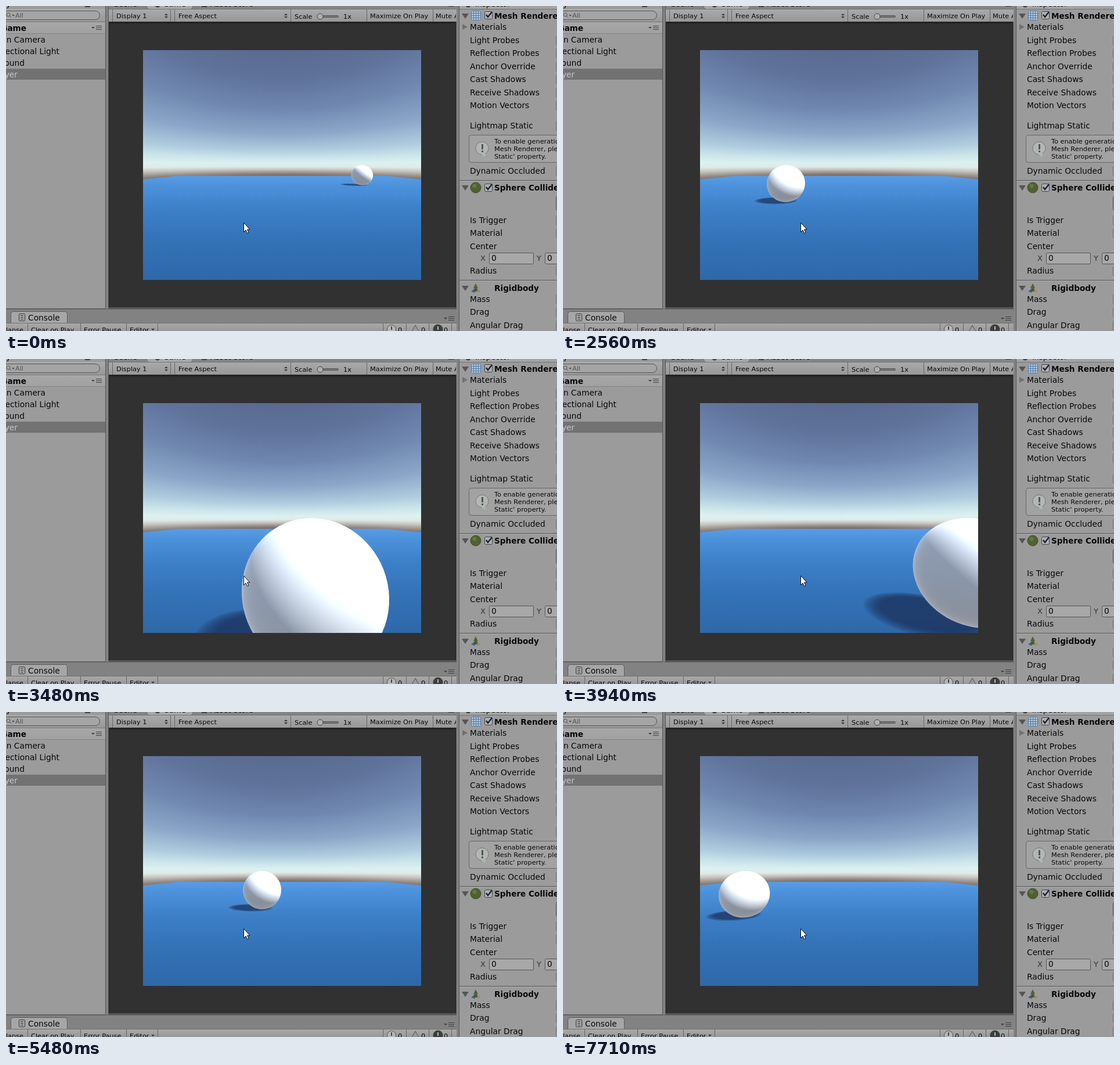
An HTML page with a canvas for the animation above (7780 ms loop, 949 px wide and 560 px high).

```html
<!DOCTYPE html>
<html lang="en">
<head>
<meta charset="utf-8">
<title>Rolling ball</title>
<style>
html, body { margin: 0; width: 100%; height: 100%; overflow: hidden; background: #828282; }
canvas { display: block; }
</style>
</head>
<body>
<canvas id="stage" width="949" height="560"></canvas>
<script>
const W = 949, H = 560, LOOP = 7780, STEPS = 101;
const VIEW = { x: 236, y: 76, w: 479, h: 396 }, CX = 475.5, CY = 274, FOCAL = 343, R = 0.5;
const LIGHT = [0.545, 0.779, -0.31];

// step, sideways position, distance from the camera
const PATH = [
  [0, 3.97, 9.9], [11, 2.9, 9.85], [21, -0.09, 9.25], [31, -1.12, 6.06], [33, -1.434, 5.42],
  [39, -1.7, 2.9], [45, 0.215, 1.455], [49, 0.95, 1.6], [53, 1.45, 2.4], [59, 1.493, 4.09],
  [64, 0.9, 5], [71, -0.523, 5.26], [75, -0.35, 4.45], [80, -0.1, 3.5], [86, 0.5, 3.1],
  [92, -0.2, 3.7], [97, -1.45, 4.05], [100, -2.034, 4.33]
];

const newCanvas = () => Object.assign(document.createElement('canvas'), { width: W, height: H });
const stage = document.getElementById('stage').getContext('2d');
const backdrop = newCanvas(), ballLayer = newCanvas();
const ballCtx = ballLayer.getContext('2d');
let g = backdrop.getContext('2d');

function box(x, y, w, h, fill) {
  g.fillStyle = fill;
  g.fillRect(x, y, w, h);
}

function poly(points, fill, stroke) {
  g.beginPath();
  points.forEach(([x, y]) => g.lineTo(x, y));
  g.closePath();
  if (fill) { g.fillStyle = fill; g.fill(); }
  if (stroke) { g.strokeStyle = stroke; g.stroke(); }
}

function round(x, y, w, h, r, fill, stroke) {
  g.beginPath();
  g.roundRect(x + 0.5, y + 0.5, w - 1, h - 1, r);
  g.fillStyle = fill;
  g.fill();
  if (stroke) { g.strokeStyle = stroke; g.stroke(); }
}

function disc(x, y, r, fill, stroke) {
  round(x - r, y - r, 2 * r, 2 * r, r, fill, stroke);
}

function text(s, x, y, { size = 13.8, color = '#080808', bold = false, align = 'left' } = {}) {
  g.font = `${bold ? 'bold ' : ''}${size}px "DejaVu Sans", sans-serif`;
  g.fillStyle = color;
  g.textAlign = align;
  g.fillText(s, x, y);
}

function gradient(y0, y1, stops) {
  const fill = g.createLinearGradient(0, y0, 0, y1);
  stops.forEach(([y, color]) => fill.addColorStop((y - y0) / (y1 - y0), color));
  return fill;
}

function clipped(x, y, w, h, draw) {
  g.save();
  g.beginPath();
  g.rect(x, y, w, h);
  g.clip();
  draw();
  g.restore();
}

const bar = (x, y, w, h) => box(x, y, w, h, gradient(y, y + h, [[y, '#aaa'], [y + h, '#989898']]));
const foldDown = (x, y) => poly([[x, y], [x + 12, y], [x + 6, y + 9]], '#555');
const project = ([x, y, z]) => [CX + FOCAL * x / z, CY - FOCAL * y / z];

function menuIcon(x, y) {
  poly([[x, y - 1], [x + 6, y - 1], [x + 3, y + 2]], '#404040');
  for (let i = -1; i < 2; i++) box(x + 8, y + i * 3, 10, 1, '#404040');
}

function spinner(x, y) {
  poly([[x - 3, y - 1], [x + 3, y - 1], [x, y - 4]], '#333');
  poly([[x - 3, y + 1], [x + 3, y + 1], [x, y + 4]], '#333');
}

function checkbox(x, y) {
  round(x, y, 14, 14, 2, '#b0b0b0', '#444');
  g.lineWidth = 2.4;
  g.strokeStyle = '#15233c';
  g.beginPath();
  g.moveTo(x + 3, y + 6);
  g.lineTo(x + 6, y + 10);
  g.lineTo(x + 13, y + 1);
  g.stroke();
  g.lineWidth = 1;
}

function drawHierarchy() {
  box(0, 0, 171, 521, '#9b9b9b');
  bar(0, 5, 171, 22);
  round(-10, 8, 172, 16, 8, '#a5a5a5', '#555');
  g.strokeStyle = '#555';
  g.beginPath();
  g.arc(4, 15, 3, 0, 7);
  g.moveTo(6, 17);
  g.lineTo(9, 20);
  g.stroke();
  poly([[10, 15], [15, 15], [12.5, 18]], '#555');
  text('All', 16, 20, { size: 11.3, color: '#555' });
  box(0, 27, 171, 21, gradient(27, 48, [[27, '#a8a8a8'], [48, '#a0a0a0']]));
  box(0, 27, 171, 1, '#777');
  box(0, 47, 171, 1, '#848484');
  text('Game', 35, 43, { size: 13.6, bold: true, align: 'right' });
  menuIcon(147, 37);
  box(0, 108, 171, 19, '#727272');
  ['Main Camera', 'Directional Light', 'Ground', 'Player'].forEach((name, i) =>
    text(name, [68, 92, 32, 20][i], 63 + 20 * i, { align: 'right', color: i == 3 ? '#c8c8c8' : '#080808' }));
  text('Hierarchy', 8, 1, { size: 13, align: 'right' });
  box(136, 0, 9, 2, '#444');
  box(171, 0, 1, 522, '#555');
  box(0, 521, 172, 1, '#555');
}

function drawSkyAndGround() {
  const sky = gradient(-200, 24, [
    [-200, '#596a90'], [-145, '#5f739b'], [-95, '#7088b0'], [-54, '#8ba6c8'], [-25, '#b0cddf'],
    [-12, '#cbe5ea'], [-3, '#dcf1f0'], [3, '#dfeae6'], [8, '#c3c2bf'], [13, '#9a918c'], [18, '#756963'],
    [24, '#655955']
  ]);
  // Lines of equal brightness bend away from the horizon towards the sides
  for (let x = 0; x < VIEW.w; x++) {
    const k = 1 + ((VIEW.x + x + 0.5 - CX) / FOCAL) ** 2;
    g.save();
    g.translate(VIEW.x + x, CY);
    g.scale(1, k);
    box(0, -198 / k, 1, 396 / k, sky);
    g.restore();
  }
  poly([[236, 298.8], [298, 292.4], [653, 292.4], [715, 298.8], [715, 472], [236, 472]],
    gradient(290, 472, [[290, '#5a9ee6'], [310, '#4c92db'], [350, '#3d80c8'], [400, '#3473b8'], [472, '#2e68a8']]));
}

function drawGamePanel() {
  box(176, 0, 600, 522, '#555');
  box(177, 0, 599, 5, '#848484');
  round(242, -12, 80, 18, 4, '#a8a8a8', '#666');
  const tab = { size: 13 };
  text('Scene', 186, 1, tab);
  text('Game', 271, 1, tab);
  text('Asset Store', 352, 1, tab);
  disc(261, -2, 5, '#444');
  box(337, 0, 9, 2, '#444');
  box(762, 0, 10, 1, '#444');
  bar(177, 5, 599, 22);
  box(177, 5, 599, 1, '#777');
  [183, 283, 290, 490, 621, 735].forEach(x => box(x, 6, 1, 21, '#666'));
  const small = { size: 11.3 };
  clipped(177, 5, 598, 22, () => {
    text('Display 1', 190, 21, small);
    text('Free Aspect', 297, 21, small);
    text('Scale', 497, 22, small);
    text('1x', 581, 22, small);
    text('Maximize On Play', 627, 21, small);
    text('Mute Audio', 740, 21, small);
  });
  spinner(276, 17);
  spinner(482, 17);
  round(541, 16, 32, 4, 2, '#777', '#555');
  disc(541, 18, 5.5, '#b0b0b0', '#444');
  box(177, 27, 598, 492, '#313131');
  box(177, 27, 598, 5, gradient(27, 32, [[27, '#1c1c1c'], [32, '#313131']]));
  box(177, 27, 1, 492, '#222');
  box(774, 27, 1, 492, '#222');
  drawSkyAndGround();
}

function drawConsole() {
  box(0, 522, 776, 24, '#828282');
  box(0, 522, 776, 1, '#6c6c6c');
  round(8, 526, 98, 24, 4, '#a6a6a6', '#5c5c5c');
  round(22, 530, 11, 13, 1, '#aaa', '#333');
  for (let i = 0; i < 3; i++) box(25, 533 + 3 * i, 5, 1, '#333');
  text('Console', 38, 542);
  menuIcon(754, 538);
  bar(0, 546, 776, 14);
  box(0, 546, 776, 1, '#707070');
  const small = { size: 11.3 };
  text('Collapse', 30, 562, { size: 11.3, align: 'right' });
  text('Clear on Play', 43, 562, small);
  text('Error Pause', 134, 562, small);
  text('Editor', 213, 562, small);
  poly([[250, 556], [256, 556], [253, 559]], '#333');
  [37, 128, 207, 261, 649, 689, 728, 767].forEach(x => box(x, 547, 1, 13, '#666'));
  disc(664, 557, 8, '#b5b8b5', '#555');
  box(663, 552, 2, 6, '#444');
  poly([[705, 550], [713, 564], [697, 564]], '#999', '#555');
  disc(744, 557, 9, '#3c403c');
  box(743, 552, 2, 6, '#bbb');
  [675, 715, 754].forEach(x => text('0', x, 562, small));
}

function drawInspector() {
  box(780, 0, 169, H, '#9b9b9b');
  box(780, 0, 1, H, '#555');
  box(781, 0, 168, 5, '#a4a4a4');
  box(781, 5, 168, 1, '#727272');
  text('Inspector', 808, 1, { size: 13 });
  disc(796, -2, 5, '#444');
  [300, 472].forEach(y => { box(781, y, 168, 1, '#555'); box(781, y + 1, 168, 1, '#aaa'); });

  const title = { size: 13.6, bold: true };
  foldDown(785, 13);
  foldDown(785, 309);
  foldDown(785, 482);
  poly([[786, 31], [795, 36], [786, 41]], '#707070');
  round(801, 8, 17, 17, 2, '#a9c3dc', '#557ba6');
  for (let i = 1; i < 4; i++) {
    box(801 + 4 * i, 8, 1, 17, '#557ba6');
    box(801, 8 + 4 * i, 17, 1, '#557ba6');
  }
  disc(809, 313, 9.5, '#4f6130', '#3d4b25');
  disc(807, 310, 4, '#66783f');
  poly([[809, 478], [813, 486], [805, 486]], '#4d6531');
  poly([[801, 492], [808, 486], [808, 494]], '#3c6080');
  poly([[818, 492], [811, 486], [811, 494]], '#a0914b');
  disc(809, 489, 3.5, '#4b5350');
  checkbox(824, 9);
  checkbox(824, 306);
  text('Mesh Renderer', 841, 22, title);
  text('Sphere Collider', 841, 318, title);
  text('Rigidbody', 841, 491, title);

  const rows = [
    ['Materials', 41], ['Light Probes', 64], ['Reflection Probes', 86], ['Anchor Override', 109],
    ['Cast Shadows', 131], ['Receive Shadows', 154], ['Motion Vectors', 176], ['Lightmap Static', 211],
    ['Dynamic Occluded', 289], ['Is Trigger', 374], ['Material', 396], ['Center', 419], ['Radius', 461],
    ['Mass', 510], ['Drag', 532], ['Angular Drag', 555]
  ];
  rows.forEach(([label, y]) => {
    text(label, 799, y);
    if (label != 'Materials' && label != 'Center') round(947, y - 13, 12, 17, 2, '#b0b0b0', '#666');
  });
  round(947, 327, 14, 26, 3, '#aaa', '#444');

  round(797, 222, 170, 48, 4, '#a2a2a2', '#666');
  disc(820, 245, 11.5, '#b3b7b3', '#777');
  poly([[818, 255], [826, 254], [825, 260]], '#b3b7b3');
  box(819, 238, 3, 9, '#555');
  box(819, 249, 3, 3, '#555');
  ['To enable generation of lightmaps', 'Mesh Renderer, please enable', "Static' property."].forEach((line, i) =>
    text(line, 841, 237 + 13 * i, { size: 11.3 }));

  text('X', 817, 439, { size: 13, color: '#333' });
  text('Y', 914, 439, { size: 13, color: '#333' });
  [832, 928].forEach(x => {
    round(x, 425, 77, 20, 2, '#a8a8a8', '#555');
    text('0', x + 4, 439);
  });
}

function ballAt(step) {
  let i = 0;
  while (i < PATH.length - 2 && step >= PATH[i + 1][0]) i++;
  const a = PATH[i], b = PATH[i + 1], span = b[0] - a[0], u = (step - a[0]) / span;
  const slope = (n, c) => {
    const p = PATH[Math.max(n - 1, 0)], q = PATH[Math.min(n + 1, PATH.length - 1)];
    return n ? (q[c] - p[c]) / (q[0] - p[0]) : 0;
  };
  const hermite = c => a[c] + (b[c] - a[c]) * u * u * (3 - 2 * u)
    + span * u * (1 - u) * (slope(i, c) * (1 - u) - slope(i + 1, c) * u);
  return [hermite(1), -R, hermite(2)];
}

const ring = point => Array.from({ length: 72 }, (_, i) => point(Math.cos(i * Math.PI / 36), Math.sin(i * Math.PI / 36)));

function drawShadow([x, , z]) {
  for (let i = 0; i < 8; i++) {
    const k = 1.01 - i * 0.04;
    // Ellipse stretched along the light's direction on the floor
    poly(ring((c, s) => project([
      x - 0.35 + k * (-0.56 * c + 0.25 * s), -1, Math.max(0.5, z + 0.2 + k * (0.32 * c + 0.43 * s))
    ])), 'rgba(28,38,82,0.13)');
  }
}

function outline([x, y, z]) {
  const d2 = x * x + y * y + z * z, f = 1 - R * R / d2, r = R * Math.sqrt(f);
  const h = Math.hypot(x, z), d = Math.sqrt(d2);
  return ring((c, s) => project([
    x * f + r * (c * z / h - s * x * y / (h * d)),
    y * f + r * s * h / d,
    z * f - r * (c * x / h + s * z * y / (h * d))
  ]));
}

function shade([x, y, z], u, v) {
  const len2 = u * u + v * v + 1, dot = u * x + v * y + z;
  const root = Math.sqrt(Math.max(0, dot * dot - len2 * (x * x + y * y + z * z - R * R)));
  const t = (dot - root) / len2;
  const n = [(u * t - x) / R, (v * t - y) / R, (t - z) / R];
  const lit = Math.max(0, n[0] * LIGHT[0] + n[1] * LIGHT[1] + n[2] * LIGHT[2]);
  const rim = 50 * (1 - Math.min(1, root / (R * Math.sqrt(len2)))) ** 3;
  const up = Math.max(0, n[1]), down = Math.max(0, -n[1]);
  return [
    138 + 6 * up - 4 * down + 225 * lit + rim,
    150 + 10 * up - 14 * down + 220 * lit + rim,
    168 + 18 * up - 26 * down + 205 * lit + rim
  ];
}

function drawBall(ball) {
  const edge = outline(ball), xs = edge.map(p => p[0]), ys = edge.map(p => p[1]);
  const x0 = Math.max(VIEW.x, Math.floor(Math.min(...xs))), y0 = Math.max(VIEW.y, Math.floor(Math.min(...ys)));
  const w = Math.min(715, Math.ceil(Math.max(...xs))) - x0, h = Math.min(472, Math.ceil(Math.max(...ys))) - y0;
  if (w < 1 || h < 1) return;
  const img = ballCtx.createImageData(w, h);
  for (let j = 0, p = 0; j < h; j++) {
    for (let i = 0; i < w; i++, p += 4) {
      const rgb = shade(ball, (x0 + i + 0.5 - CX) / FOCAL, (CY - y0 - j - 0.5) / FOCAL);
      img.data.set([...rgb, 255], p);
    }
  }
  ballCtx.putImageData(img, x0, y0);
  g.save();
  poly(edge);
  g.clip();
  g.drawImage(ballLayer, x0, y0, w, h, x0, y0, w, h);
  g.restore();
}

function drawCursor() {
  poly([[409.5, 373.5], [409.5, 389.5], [413, 386], [415.7, 391.5], [418, 390.5], [415.5, 385], [420, 385]], '#fff', '#111');
}

drawHierarchy();
drawGamePanel();
drawConsole();
drawInspector();
g = stage;

let shown = -1;
const start = performance.now();
function tick() {
  const step = Math.floor((performance.now() - start) % LOOP / LOOP * STEPS);
  if (step != shown) {
    shown = step;
    const ball = ballAt(step);
    g.drawImage(backdrop, 0, 0);
    clipped(VIEW.x, VIEW.y, VIEW.w, VIEW.h, () => {
      drawShadow(ball);
      drawBall(ball);
    });
    drawCursor();
  }
  requestAnimationFrame(tick);
}
tick();
</script>
</body>
</html>
```
